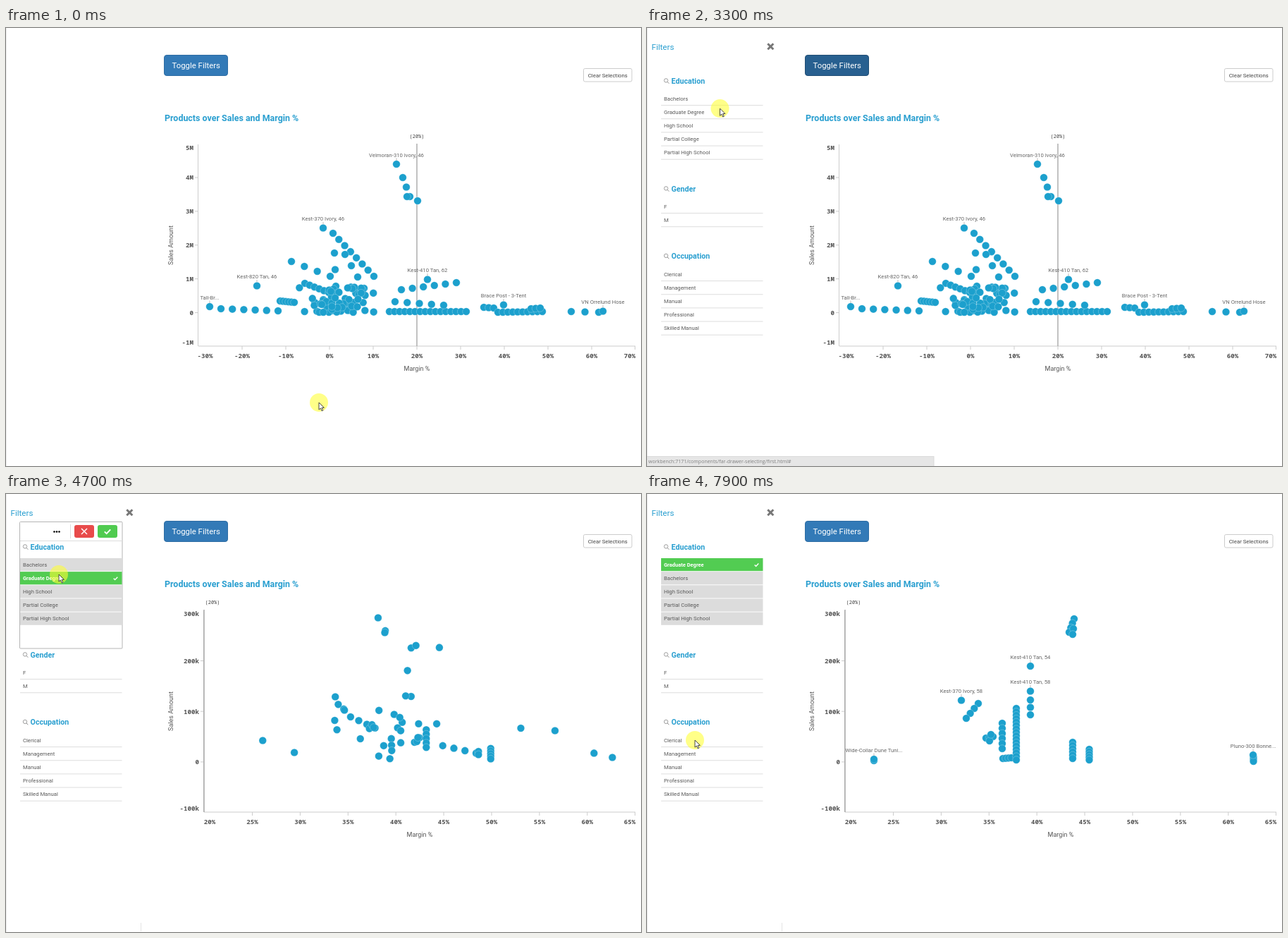
Animation, 901 px wide and 621 px high, one loop 8000 ms. Source, as an HTML page:

```html
<!DOCTYPE html>
<html lang="en">
<head>
<meta charset="utf-8">
<title>Side drawer filters</title>
<style>
  html, body { margin: 0; width: 100%; height: 100%; overflow: hidden; background: #fff; }
  svg { display: block; width: 901px; height: 621px; font-family: Roboto, sans-serif; }
  .mono { font: 600 9.2px "Noto Sans Mono", monospace; fill: #555; }
  .label { font-size: 7.7px; fill: #666; }
  .dot { fill: #1ca0cd; stroke: #fff; stroke-opacity: .35; stroke-width: .7; }
  .blue { fill: #2a9fd0; }
  .mid { text-anchor: middle; }
  .end { text-anchor: end; }
</style>
</head>
<body>
<svg id="stage" viewBox="0 0 901 621"></svg>
<script>
const LOOP = 8000, STEP = 200;
const stage = document.getElementById('stage');

// Motion helpers
const clamp = v => Math.min(1, Math.max(0, v));
const mix = (a, b, k) => a + (b - a) * k;
const ease = k => k * k * (3 - 2 * k);
const progress = (t, from, to) => ease(clamp((t - from) / (to - from)));

// Drawing helpers
const text = (s, x, y, size, fill = '#555', extra = '') =>
  `<text x="${x}" y="${y}" ${size ? `font-size="${size}" fill="${fill}"` : ''} ${extra}>${s}</text>`;
const line = (x1, y1, x2, y2, stroke = '#ccc', w = 1) =>
  `<path d="M${x1} ${y1}L${x2} ${y2}" stroke="${stroke}" stroke-width="${w}"/>`;
const rect = (x, y, w, h, fill, extra = '') =>
  `<rect x="${x}" y="${y}" width="${w}" height="${h}" fill="${fill}" ${extra}/>`;
const circles = (dots, r, cls = 'dot') =>
  dots.map(([x, y]) => `<circle cx="${x}" cy="${y}" r="${r}" class="${cls}"/>`).join('');
const check = (x, y, s, w) =>
  `<path d="M${x - s} ${y}l${s * .7} ${s * .7}l${s * 1.3} ${-s * 1.4}" fill="none" stroke="#fff" stroke-width="${w}"/>`;
const cross = (x, y, s, color, w) =>
  line(x - s, y - s, x + s, y + s, color, w) + line(x - s, y + s, x + s, y - s, color, w);

// Data helpers
const run = (x0, y0, x1, y1, n) =>
  Array.from({ length: n }, (_, i) => [mix(x0, x1, i / (n - 1)), mix(y0, y1, i / (n - 1))]);
const ramp = (first, start, step, n, last) =>
  [first, ...Array.from({ length: n }, (_, i) => start + step * i), last];

function scatter(n, seed, place) {
  const random = () => {
    seed = (seed + 0x6d2b79f5) | 0;
    let h = Math.imul(seed ^ (seed >>> 15), 1 | seed);
    h = (h + Math.imul(h ^ (h >>> 7), 61 | h)) ^ h;
    return ((h ^ (h >>> 14)) >>> 0) / 4294967296;
  };
  return Array.from({ length: n }, () => place(random));
}

// A labelled dot hangs below its label.
const labelled = labels => labels.map(([, x, y]) => [x, y + 13]);
const chart = spec => ({ ...spec, dots: [...spec.dots, ...labelled(spec.labels)] });

const percents = (from, step, xs) => xs.map((x, i) => [from + step * i + '%', x]);
const ticksY = (names, ys) => names.split(' ').map((s, i) => [s, ys[i]]);
const thousands = ticksY('300k 200k 100k 0 -100k', ramp(170, 236.5, 71.7, 3, 446));

const fullChart = chart({
  left: 273, mark: 583, markLabel: 583, title: 583,
  x: percents(-30, 10, ramp(282.5, 335, 62, 9, 885)),
  y: ticksY('5M 4M 3M 2M 1M 0 -1M', ramp(170, 212, 47.9, 5, 446)),
  dots: [
    ...run(563, 212, 573, 239, 3), ...run(569, 239, 584, 245, 2),
    ...run(464, 291, 522, 352, 8), ...run(405, 331, 460, 352, 4),
    ...run(424, 362, 458, 375, 6), ...run(466, 319, 468, 366, 3), ...run(481, 321, 508, 369, 4),
    ...run(561, 371, 639, 361, 6), ...run(389, 387, 409, 389, 6),
    ...scatter(66, 7, r => [mix(412, 530, (r() + r()) / 2), 403 - 36 * r() ** 1.6]),
    ...run(305, 398, 386, 401, 6), ...run(544, 402, 653, 402, 16), ...run(552, 388, 621, 393, 5),
    ...run(678, 396, 692, 397, 3), ...run(698, 403, 761, 402, 10), ...run(745, 398, 758, 397, 3),
    ...run(802, 402, 841, 403, 3)
  ],
  labels: [['Velmoran-310 Ivory, 46', 554, 180], ['Kest-370 Ivory, 46', 450, 270.5],
    ['Kest-820 Tan, 46', 356, 352.5], ['Kest-410 Tan, 62', 598, 343.5], ['Tall-Br...', 289, 382],
    ['Brace Post - 3-Tent', 706, 379.5], ['VN Orrelund Hose', 847, 388.5]]
});

const zoomChart = chart({
  left: 273, mark: 273, markLabel: 285, title: 583,
  x: percents(20, 5, ramp(281, 342, 68.8, 8, 885)),
  y: thousands,
  dots: [
    [305, 171], ...run(351, 224, 355, 216, 2), ...run(506, 282, 515, 283, 2),
    ...run(646, 271, 663, 273, 2), ...run(570, 341, 614, 354, 2), ...run(543, 370, 847, 372, 6),
    ...run(860, 350, 860, 375, 8)
  ],
  outliers: [...run(268, 160, 398, 160, 7), ...run(268, 170, 268, 346, 20)],
  labels: [['Velmoran-700-K Copper, 46', 359, 193.5], ['Brace Post - 3-Tent', 546, 198.5],
    ['Morwent Robe, L', 485, 255], ['Pluno-300 Bonnet, Teal', 643, 255.5],
    ['Insulated Pail - 40 cl.', 633, 292.5], ['Morwent Robe, S', 544, 302],
    ["Ladies' Orrelund Skirts, S", 658, 326.5], ['Juice Beaker - 50 cl.', 761, 347],
    ['VN Orrelund Hose', 860, 333.5], ['Plain-Collar Morwent T...', 314, 352]]
});

const filteredChart = chart({
  left: 281, mark: 281, markLabel: 293, title: 587,
  x: percents(20, 5, ramp(289, 349.5, 67.9, 8, 885)),
  y: thousands,
  dots: [
    ...run(606, 177, 599, 196, 4), ...run(605, 191, 604, 199, 2), ...run(544, 292, 544, 313, 3),
    ...run(470, 297, 453, 318, 4), ...run(481, 346, 491, 344, 3), ...run(486, 350, 488, 341, 2),
    ...run(504, 325, 504, 361, 6), ...run(505, 375, 517, 374, 4), ...run(524, 304, 524, 377, 16),
    ...run(604, 352, 604, 375, 6), ...run(627.5, 362, 627.5, 377, 5),
    ...run(860.5, 373, 860.5, 379, 3), [322, 378]
  ],
  labels: [['Kest-410 Tan, 54', 544, 231], ['Kest-410 Tan, 58', 544, 266.5],
    ['Kest-370 Ivory, 58', 446, 279.5], ['Wide-Collar Dune Tuni...', 322, 363],
    ['Pluno-300 Bonne...', 860, 357]]
});

function drawChart({ left, mark, markLabel, title, x, y, dots, outliers = [], labels }) {
  const inner = (list, i) => i > 0 && i < list.length - 1;
  const axisX = x.map(([s, px], i) => text(s, px, 468, 0, '', 'class="mono mid"') +
    (inner(x, i) ? line(px, 451, px, 456) : '')).join('');
  const axisY = y.map(([s, py], i) => text(s, left - 7, py + 3.3, 0, '', 'class="mono end"') +
    (inner(y, i) ? line(left - 5, py, left, py) : '')).join('');
  const names = labels.map(([s, px, py]) =>
    line(px, py + 4.5, px, py + 8, '#bbb') + text(s, px, py + 2.7, 0, '', 'class="label mid"')).join('');
  return line(left - .5, 165, left - .5, 451) + line(left, 451, 893, 451) + line(892.5, 451, 892.5, 456) +
    axisX + axisY + line(mark, 164, mark, 451, '#999', 1.2) +
    text('(20%)', markLabel, 155.5, 7, '#444', 'class="mid" font-family="Noto Sans Mono, monospace"') +
    text('Margin %', title, 486, 9, '#555', 'class="mid"') +
    text('Sales Amount', 0, 0, 9, '#555', 'class="mid" transform="translate(237 308) rotate(-90)"') +
    circles(dots, 5.3) + circles(outliers, 1.9, 'blue') + names;
}

function chartAt(t) {
  if (t < 4300) return fullChart;
  const k = progress(t, 4300, 4900);
  if (k === 0) return zoomChart;
  if (k === 1) return filteredChart;
  const dots = filteredChart.dots.map(([x, y], i) => {
    const [fromX, fromY] = zoomChart.dots[i % zoomChart.dots.length];
    return [mix(fromX, x, k), mix(fromY, y, k)];
  });
  return { ...filteredChart, dots, labels: [] };
}

const heading = (s, y) =>
  `<circle cx="27" cy="${y - .6}" r="2.7" fill="none" stroke="#888" stroke-width=".8"/>` +
  line(29, y + 1.4, 31.3, y + 3.7, '#888') +
  text(s, 34.5, y + 3.9, 10.7, '#2a9fd0', 'font-weight="700"');

const row = (s, y, state) => {
  const on = state === 'on';
  return (state ? rect(20, y - 9, 144.5, 18.2, on ? '#52cc52' : '#dcdcdc') : line(20, y + 9.6, 164.5, y + 9.6, '#ddd')) +
    text(s, 24, y + 2.7, on ? 7.5 : 7.7, on ? '#fff' : '#595959', on ? 'font-weight="700"' : '') +
    (on ? check(155.5, y + .5, 2.8, 1.4) : '');
};
const rows = (names, y, state = () => '') => names.map((s, i) => row(s, y + 19.15 * i, state(s))).join('');

const popup = () =>
  rect(19.5, 39.5, 145.5, 179.5, '#fff', 'stroke="#b5b5b5" rx="1"') + line(20, 66.5, 165, 66.5, '#ddd') +
  circles(run(68.5, 53.5, 75.5, 53.5, 3), 1.3, '') + line(91.5, 43, 91.5, 63, '#ddd') +
  rect(97, 44, 28, 18, '#e84b4b', 'rx="3"') + cross(111, 53, 4, '#fff', 1.4) +
  rect(130, 44, 28, 18, '#50cb50', 'rx="3"') + check(144, 53.3, 4.2, 1.9);

function drawPanel(t) {
  if (t < 2100) return '';
  const pick = 'Graduate Degree';
  const others = ['Bachelors', 'High School', 'Partial College', 'Partial High School'];
  const confirmed = t >= 6500;
  const names = others.toSpliced(confirmed ? 0 : 1, 0, pick);
  const state = s => t < 3900 ? '' : s === pick ? 'on' : t < 4100 ? '' : 'off';
  return `<g transform="translate(${t < 2300 ? -80 : 0})">` +
    text('Filters', 6.5, 31, 11.6, '#2a9fd0') + cross(175.3, 26.3, 4, '#777', 3) +
    (t >= 3900 && !confirmed ? popup() : '') +
    heading('Education', 75) + rows(names, 100, state) +
    heading('Gender', 228) + rows(['F', 'M'], 253) +
    heading('Occupation', 323.5) +
    rows(['Clerical', 'Management', 'Manual', 'Professional', 'Skilled Manual'], 349) +
    (t >= 3500 ? line(191.5, 608, 191.5, 620, '#e4e4e4') : '') + '</g>';
}

function drawHeader(t) {
  const hover = t >= 1300 && t < 3700;
  return rect(224.5, 38.5, 90, 29, hover ? '#286090' : '#337ab7',
      `rx="3.5" stroke="${hover ? '#204d74' : '#2e6da4'}"`) +
    text('Toggle Filters', 269.7, 56.8, 11.4, '#fff', 'class="mid"') +
    rect(819.5, 57.5, 68.5, 18.5, '#fff', 'rx="2" stroke="#ccc"') +
    text('Clear Selections', 853.8, 69.8, 7.8, '#444', 'class="mid"') +
    text('Products over Sales and Margin %', 225, 132, 12.45, '#2a9fd0', 'font-weight="700"');
}

const drawStatus = t => t < 1700 || t >= 3500 ? '' :
  `<g opacity="${t < 3300 ? 1 : .75}">` + rect(-.5, 607.5, 407.5, 15, '#dedede', 'stroke="#cfcfcf"') +
  text('workbench:7171/components/far-drawer-selecting/first.html#', 2, 617.2, 7, '#555',
    'font-family="Open Sans, sans-serif"') + '</g>';

// Each leg bends towards a control point on its way to the next stop.
const start = [444, 531];
const legs = [
  { from: 300, to: 1500, bend: [560, 330], stop: [271.5, 54] },
  { from: 2700, to: 3500, bend: [165, 120], stop: [75, 114] },
  { from: 5100, to: 5700, bend: [72, 180], stop: [72, 248] },
  { from: 5700, to: 6300, bend: [95, 130], stop: [139, 62] },
  { from: 7100, to: 7900, bend: [104, 342], stop: [68, 349] }
];
const cursorAt = t => legs.reduce((pos, { from, to, bend, stop }) => {
  const k = progress(t, from, to);
  return pos.map((p, i) => mix(mix(p, bend[i], k), mix(bend[i], stop[i], k), k));
}, start);

function drawCursor(t) {
  const hand = t >= 1300 && t < 2900, pressed = t >= 1700 && t < 2100;
  const shape = hand
    ? 'M1 1.5q1-1.3 2 0v4.2l4.2 1q1.4.4 1.2 2l-.7 4.3h-5l-3.5-4.2q-.3-1.5 1.8-.2z'
    : 'M0 0v10.2l2.4-2.2 1.7 3.9 1.7-.7-1.7-3.8h3.3z';
  return `<g transform="translate(${cursorAt(t)})"><circle r="13" fill="${pressed ? '#dcaa10' : '#ffff32'}" ` +
    `fill-opacity="${pressed ? .62 : .58}"/><path d="${shape}" fill="#fff" stroke="#333" stroke-width=".9"/></g>`;
}

// The picture is held between steps.
let shown = -1;
function frame(now) {
  const t = Math.max(0, Math.floor((now % LOOP + STEP / 2) / STEP) * STEP - STEP / 2);
  if (t !== shown) {
    shown = t;
    stage.innerHTML = line(.5, 0, .5, 621, '#eee') + drawChart(chartAt(t)) + drawHeader(t) +
      drawPanel(t) + drawStatus(t) + drawCursor(t);
  }
  requestAnimationFrame(frame);
}
frame(performance.now());
</script>
</body>
</html>
```
